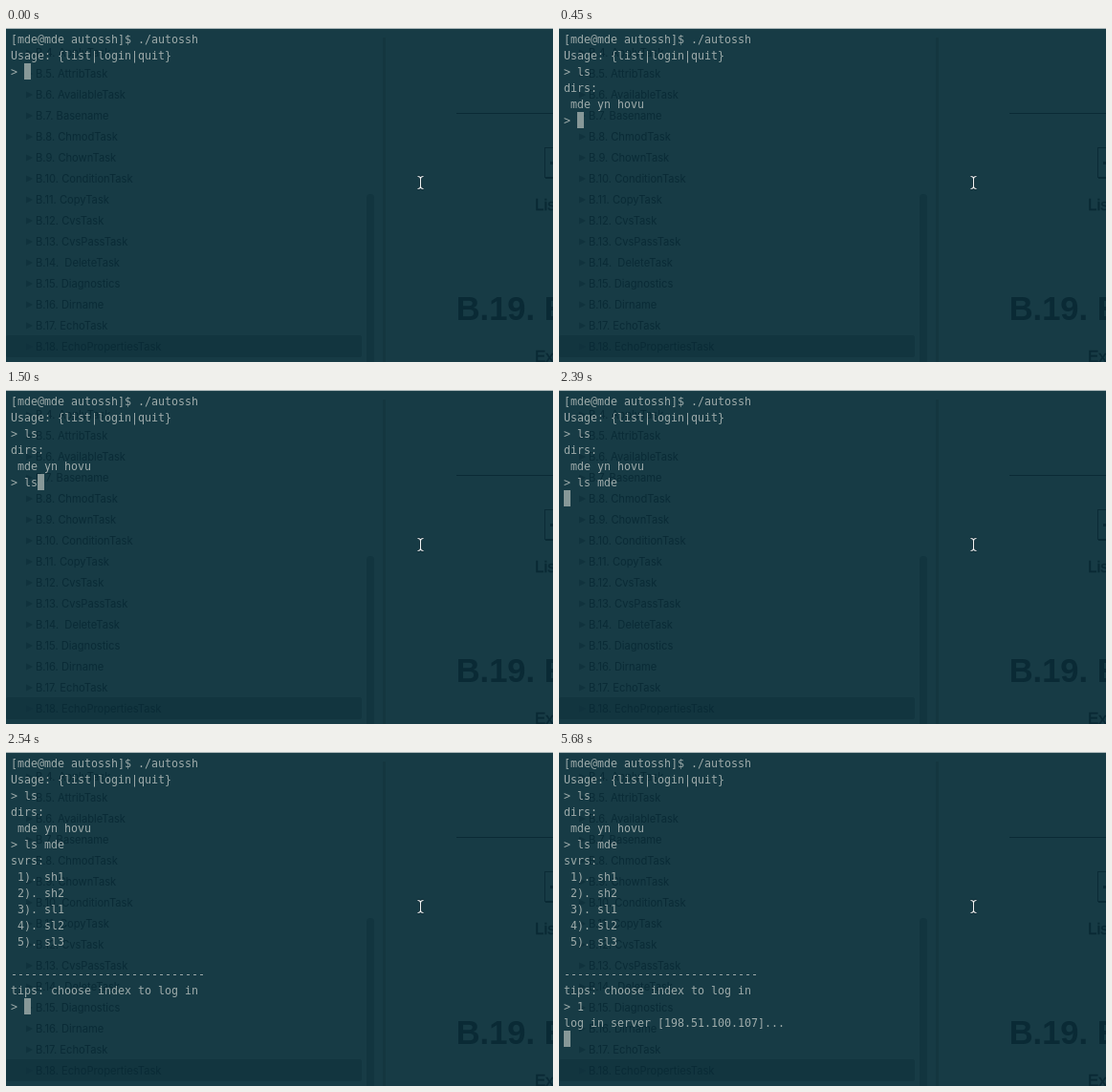
An HTML page for the animation above (8000 ms loop, 572 by 350 pixels).

```html
<!DOCTYPE html>
<html lang="en">
<head>
<meta charset="utf-8">
<title>Terminal session</title>
<style>
  html, body { margin: 0; width: 100%; height: 100%; overflow: hidden; background: #173b45; }
  svg { display: block; width: 572px; height: 350px; }
  text { white-space: pre; }
  .page { fill: #0a2a35; font-family: "Liberation Sans", Arial, sans-serif; }
  .body { font-size: 17px; stroke: #0a2a35; stroke-width: .4; }
  .toc { fill: #0a2b36; font: 11.15px Inter, sans-serif; }
  .toc path { fill: #10323d; }
  .term { fill: #9eabaa; font: 11.63px "DejaVu Sans Mono", monospace; }
</style>
</head>
<body>
<svg viewBox="0 0 572 350">
  <rect width="572" height="350" fill="#173b45"/>
  <rect width="572" height="1" fill="#a9b5b7"/>
  <rect y="322" width="372" height="23" rx="2" fill="#12353f"/>
  <rect x="377" y="174" width="8" height="180" rx="4" fill="#12353f"/>
  <rect x="394" y="10" width="3" height="340" fill="#14363f"/>
  <g id="toc" class="toc"></g>
  <g class="page">
    <rect x="471" y="89" width="101" height="1"/>
    <rect x="563.5" y="125.5" width="30" height="31" fill="none" stroke="#0b2b36"/>
    <rect x="564" y="156" width="8" height="2"/>
    <rect x="569" y="140" width="3" height="3"/>
    <text class="body" x="553" y="191">List</text>
    <text x="470.7" y="306" font-size="34.5" font-weight="bold">B.19. E</text>
    <text class="body" x="553" y="350">Exa</text>
  </g>
  <g id="term" class="term"></g>
  <rect id="caret" width="7" height="17" fill="#879898"/>
  <g fill="none">
    <use href="#beam" stroke="#0a252e" stroke-width="2.4"/>
    <use href="#beam" stroke="#f0f3f3" stroke-width="1.1"/>
  </g>
  <defs>
    <path id="beam" d="M430.5 155.5q3 0 3 2.5v8q0 2.5-3 2.5M436.5 155.5q-3 0-3 2.5v8q0 2.5 3 2.5"/>
  </defs>
</svg>
<script>
const NS = 'http://www.w3.org/2000/svg';
const LOOP = 8000, CELL = 7, ROW = 17, LEFT = 5, TOP = 3;
const byId = id => document.getElementById(id);

function add(parent, tag, attrs, text = '') {
  const node = document.createElementNS(NS, tag);
  for (const key in attrs) node.setAttribute(key, attrs[key]);
  node.textContent = text;
  return parent.appendChild(node);
}

// Contents list showing through the translucent window
['ApplyTask', 'AttribTask', 'AvailableTask', 'Basename', 'ChmodTask', 'ChownTask',
 'ConditionTask', 'CopyTask', 'CvsTask', 'CvsPassTask', ' DeleteTask', 'Diagnostics',
 'Dirname', 'EchoTask', 'EchoPropertiesTask'].forEach((name, i) => {
  const y = 26 + 22 * i;
  add(byId('toc'), 'path', { d: `M21 ${y - 3.5}l7 3.5l-7 3.5z` });
  add(byId('toc'), 'text', { x: 31, y: y + 4 }, `B.${i + 4}. ${name}`);
});

// The caret always follows the last character of the screen
const start = '[mde@mde autossh]$ ./autossh\nUsage: {list|login|quit}\n> ';
const dirs = start + 'ls\ndirs:\n mde yn hovu\n> ';
const servers = ['sh1', 'sh2', 'sl1', 'sl2', 'sl3'].map((s, i) => ` ${i + 1}). ${s}\n`).join('');
const listed = dirs + 'ls mde\nsvrs:\n' + servers + '\n' + '-'.repeat(29) +
  '\ntips: choose index to log in\n> ';
const steps = [
  [0, start],
  [300, start + 'ls'],
  [450, dirs],
  [1500, dirs + 'ls'],
  [1800, dirs + 'ls m'],
  [2100, dirs + 'ls mde'],
  [2390, dirs + 'ls mde\n'],
  [2540, listed],
  [5230, listed + '1'],
  [5680, listed + '1\nlog in server [198.51.100.107]...\n']
];

const rows = Array.from({ length: 18 }, (_, i) =>
  add(byId('term'), 'text', { x: LEFT, y: TOP + 13 + ROW * i }));
let shown;

function render(time) {
  const screen = steps.filter(([at]) => at <= time).pop()[1];
  if (screen === shown) return;
  shown = screen;
  const lines = screen.split('\n');
  rows.forEach((row, i) => { row.textContent = lines[i] || ''; });
  const last = lines.length - 1;
  byId('caret').setAttribute('x', LEFT + CELL * lines[last].length);
  byId('caret').setAttribute('y', TOP + ROW * last);
}

const origin = performance.now();
function tick() {
  render((performance.now() - origin) % LOOP);
  requestAnimationFrame(tick);
}
tick();
</script>
</body>
</html>
```
